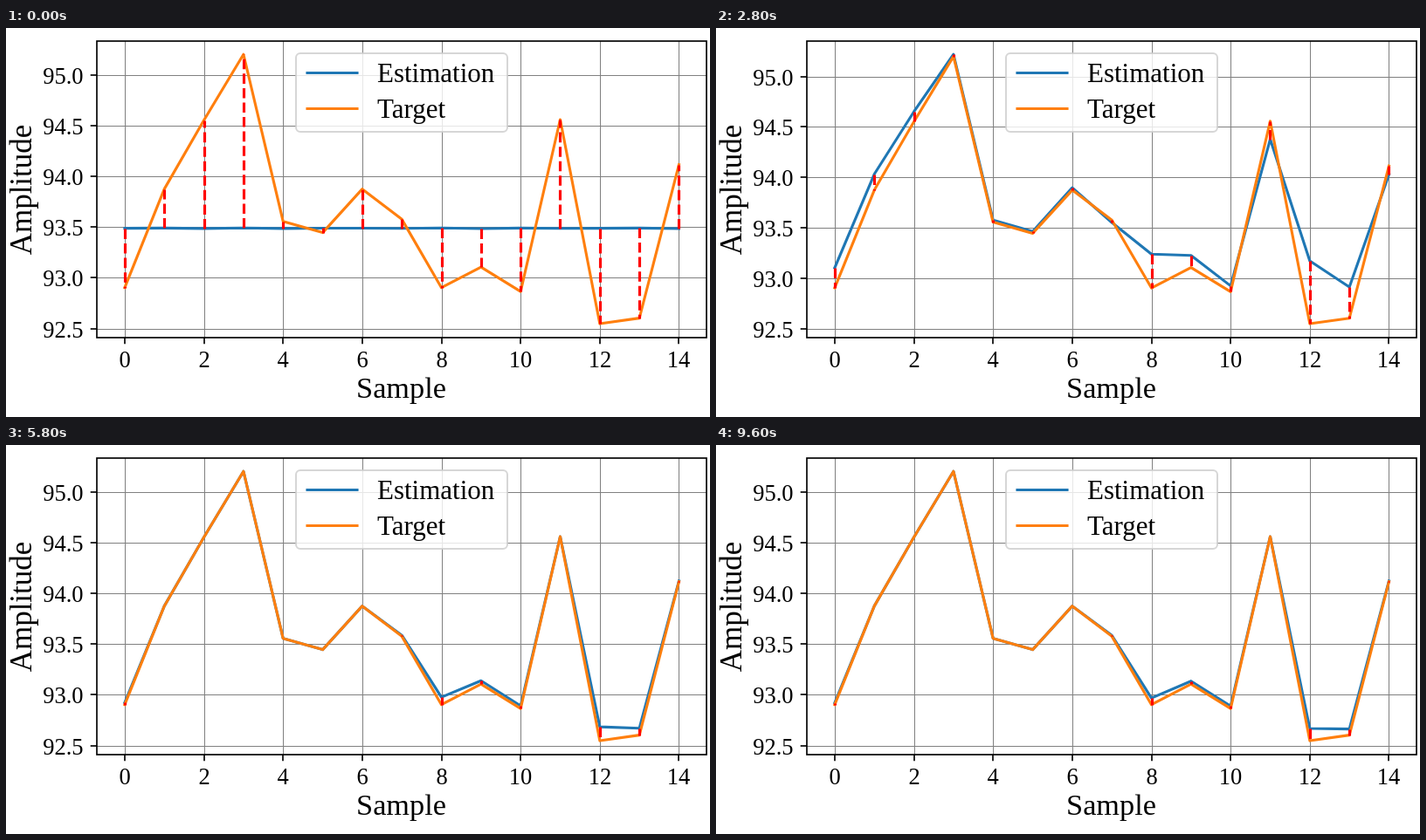
Animation of 806 by 446 pixels, one loop 9800 ms. Source, as an HTML page with a canvas:

```html
<!DOCTYPE html>
<html lang="en">
<head>
<meta charset="utf-8">
<title>Estimation fitting</title>
<style>
  html, body { margin: 0; overflow: hidden; background: #fff; }
  canvas { display: block; }
</style>
</head>
<body>
<canvas id="chart" width="806" height="446"></canvas>
<script>
const ctx = document.getElementById('chart').getContext('2d');
const LOOP = 9800, STEP = 200, LEARN = 2;
const BOX = { left: 104.2, top: 14.8, right: 802.2, bottom: 354.5 };
const BLUE = '#1f77b4', ORANGE = '#ff7f0e';
const LINE = 3.125, THIN = 1.67, START = 1488;

// Thousandths above 92, and how far the estimate is off once the shape is learned
const target = [904, 1874, 2552, 3200, 1556, 1445, 1874, 1576, 903, 1106, 865, 2558, 548, 603, 2114];
const lag = [99, -60, -99, -369, -189, -121, -434, 53, 383, 171, 138, -40, 711, 352, 39];

const bell = x => Math.exp(-x * x);

// Leave the flat start, then let overestimates fade slowly and underestimates spring back
function errorAt(i, seconds) {
  const flat = START + 3 * Math.sin(i * 2.6) - target[i];
  if (seconds < LEARN) return flat + (lag[i] - flat) * seconds / LEARN;
  const s = seconds - LEARN;
  const fade = lag[i] > 0
    ? 0.17 + 0.83 * bell(s / 2)
    : 1.4 * Math.exp(-s / 0.2) - 0.4 * Math.exp(-s / 0.5);
  const wobble = 200 * Math.cos(Math.PI * i / 11) * bell(lag[i] / 130) * bell((s - 0.8) / 0.4);
  return lag[i] * fade + wobble;
}

function line(points, color, width, cap = 'butt', dash = []) {
  ctx.beginPath();
  points.forEach(p => ctx.lineTo(...p));
  ctx.strokeStyle = color;
  ctx.lineWidth = width;
  ctx.lineCap = cap;
  ctx.lineJoin = 'round';
  ctx.setLineDash(dash);
  ctx.stroke();
}

function label(text, x, y, size, align) {
  ctx.font = `${size}px "Liberation Serif", serif`;
  ctx.textAlign = align;
  ctx.fillStyle = '#000';
  ctx.fillText(text, x, y);
}

function drawLegend() {
  ctx.beginPath();
  ctx.roundRect(332, 29, 242, 90, 5);
  ctx.fillStyle = 'rgba(255,255,255,.8)';
  ctx.fill();
  ctx.strokeStyle = 'rgba(204,204,204,.8)';
  ctx.lineWidth = 2;
  ctx.setLineDash([]);
  ctx.stroke();
  [['Estimation', BLUE, 51.5], ['Target', ORANGE, 92.5]].forEach(([name, color, y]) => {
    line([[345, y], [402, y]], color, LINE, 'square');
    label(name, 425, y + 10, 31, 'left');
  });
}

function draw(seconds) {
  const { left, top, right, bottom } = BOX;
  const estimation = target.map((v, i) => v + errorAt(i, seconds));
  const all = [...target, ...estimation];
  const low = Math.min(...all), high = Math.max(...all);
  const padX = (right - left) / 22, padY = (bottom - top) / 22;
  const xOf = i => left + padX + i * padX * 20 / 14;
  const yOf = v => bottom - padY - (v - low) / (high - low) * padY * 20;
  const series = values => values.map((v, i) => [xOf(i), yOf(v)]);
  const snap = n => Math.round(n) + 0.5;
  const [x0, y0, x1, y1] = [left, top, right, bottom].map(Math.round);

  ctx.fillStyle = '#fff';
  ctx.fillRect(0, 0, 806, 446);

  for (let i = 0; i <= 14; i += 2) {
    const x = snap(xOf(i));
    line([[x, y0], [x, y1]], '#808080', 1);
    line([[x - 0.5, y1], [x - 0.5, y1 + 7.3]], '#000', THIN);
    label(i, x - 0.5, 389, 26.5, 'center');
  }
  for (let v = 500; v <= 3000; v += 500) {
    const y = snap(yOf(v));
    line([[x0, y], [x1, y]], '#808080', 1);
    line([[x0 - 7.3, y - 0.5], [x0, y - 0.5]], '#000', THIN);
    label((92 + v / 1000).toFixed(1), 88.5, y + 9, 26.5, 'right');
  }

  line(series(estimation), BLUE, LINE, 'square');
  line(series(target), ORANGE, LINE, 'square');
  target.forEach((v, i) => {
    const x = snap(xOf(i));
    line([[x, snap(yOf(estimation[i]))], [x, snap(yOf(v))]], '#f00', LINE, 'butt', [11.56, 5]);
  });

  ctx.setLineDash([]);
  ctx.strokeStyle = '#000';
  ctx.lineWidth = THIN;
  ctx.lineJoin = 'miter';
  ctx.strokeRect(x0, y0, x1 - x0, y1 - y0);

  label('Sample', 452.5, 424, 34.3, 'center');
  ctx.save();
  ctx.translate(28.5, 185.5);
  ctx.rotate(-Math.PI / 2);
  label('Amplitude', 0, 0, 35, 'center');
  ctx.restore();
  drawLegend();
}

function tick() {
  const time = performance.now() % LOOP;
  draw(Math.floor(time / STEP) * STEP / 1000);
  requestAnimationFrame(tick);
}
tick();
</script>
</body>
</html>
```
